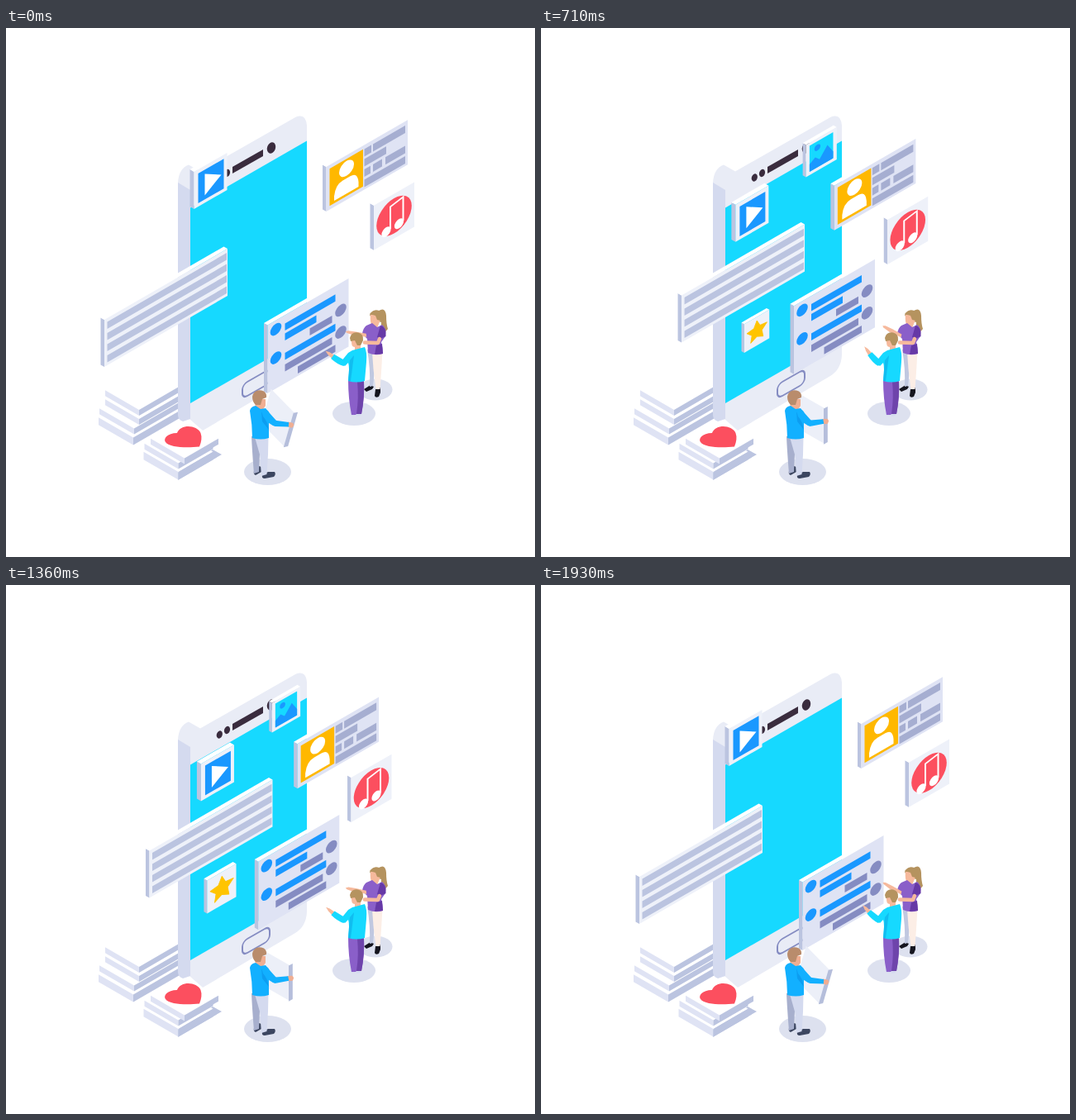
An HTML page for the animation above (2430 ms loop, 640 px wide and 640 px high).

```html
<!DOCTYPE html>
<html lang="en">
<head>
<meta charset="utf-8">
<title>Isometric phone</title>
<style>
html, body { margin: 0; width: 100%; height: 100%; overflow: hidden; background: #fff }
svg { display: block; width: 100vw; height: 100vh }
</style>
</head>
<body>
<svg viewBox="0 0 640 640">
  <g id="books"></g>
  <path fill="#fc4f5f" d="M234 506.500Q238 497 235.500 490C231 480 211 479 207 490C195 490 190 497 193 501C198 508 220 508 234 506.500Z"/>

  <g id="phone">
    <path fill="#e9ecf6" d="M208 187Q209 170 221 165.500L235 173.500L351 107.500Q363 103 364 118V396Q363 413 350 421L238 487L222 473Z"/>
    <path fill="#d4daef" d="M208 187L223 196V473L214 476Q208 474 208 468Z"/>
    <path fill="#16d9ff" d="M223 217.500L364 136.500V373L223 454Z"/>
    <g fill="#3a2c3e">
      <path d="M274 168L311 147V155L274 176Z"/>
      <ellipse cx="321" cy="145" rx="5" ry="6.800" transform="rotate(20 321 145)"/>
      <ellipse cx="258.300" cy="181" rx="3.400" ry="4.800" transform="rotate(20 258.300 181)"/>
      <ellipse cx="267.500" cy="175.500" rx="3.400" ry="4.800" transform="rotate(20 267.500 175.500)"/>
    </g>
    <rect width="33" height="17" rx="6" transform="matrix(1 -.577 0 1 286 431.500)" fill="none" stroke="#858cc2" stroke-width="2"/>
  </g>

  <g id="panels"></g>

  <g fill="#dde1ef">
    <ellipse cx="316.500" cy="537" rx="28.500" ry="16"/>
    <ellipse cx="421" cy="466.500" rx="26" ry="14.500"/>
    <ellipse cx="447" cy="437.500" rx="20.500" ry="13"/>
  </g>

  <g id="woman">
    <path fill="#15151f" d="M433 437L441 432L445 434L443 437L436 440ZM447 437L453 435V441L451 446Q447 448 446 445Z"/>
    <path fill="#c0c8e0" d="M437 389H448L446 414L444 433L440 434Q441 412 437 389Z"/>
    <path fill="#fceee6" d="M443 392L455.500 391L454 416L452.500 437H447.500Q444 414 443 392Z"/>
    <path fill="#b5935f" d="M440 347Q444 340 451 342Q459 337 460 348Q460 358 462 364L457 370Q453 364 454 356L443 353Z"/>
    <path fill="#f6b99c" d="M441 347L450 346L453 353L449 363L443 361Q440 355 441 347Z"/>
    <path fill="#b5935f" d="M440 346Q446 339 453 343L453 354L449 353L447 348Z"/>
    <path fill="#8a5fc9" d="M436 360L443 357L449 362L455 359Q461 363 459 373L454 380Q456 387 456 394Q447 397 438 393L437 376L431 370Q432 363 436 360Z"/>
    <path fill="#6639a6" d="M453 360Q460 361 459.500 373L453 376L449 374ZM448 384L455 382L456 394L446 395Z"/>
    <path fill="none" stroke="#f6b99c" stroke-width="4.500" stroke-linecap="round" stroke-linejoin="round" d="M452 376L450 381L434 380.500"/>
    <path id="wave" fill="#f6b99c" d="M436 374L421 370L413 366L411.500 364L415 363.500L424 366L436 370Z"/>
  </g>

  <g id="man">
    <path fill="#d4daef" d="M417 464H423V468Q420 470 417 468ZM424 464H429V469L424 470Z"/>
    <path fill="#8a5fc9" d="M414 426H433Q434 447 430 467H424L423 468H418Q414 448 414 426Z"/>
    <path fill="#6e44ab" d="M425 428H433Q434 447 430 467H424Q427 448 425 428Z"/>
    <path fill="#f6b99c" d="M418 376H429V390L422 391V386Q417 386 418 376Z"/>
    <path fill="#b5935f" d="M416 375Q418 367 426 368.500Q433 370 432 378L429 384L425 384L422 378L417 379Z"/>
    <path fill="#16d9ff" d="M419 390L434 386Q437 392 436 404L434 427Q424 430 414 427Q416 410 414 405L410 409L405 404L414 393Z"/>
    <path fill="#11bdf0" d="M416 402L421 396L417 427L414 427Z"/>
    <g id="point">
      <path fill="#f6b99c" d="M395 398L391 393L388.500 388L393 390L399 395Z"/>
      <path fill="#16d9ff" d="M394 398L398.500 393.500L410 402L411 407L408 409Q401 406 394 398Z"/>
    </g>
  </g>

  <g id="holder">
    <g id="board">
      <path fill="#eceff8" d="M308 440L343 460V503L308 483Z"/>
      <path fill="#b5bedb" d="M342 460.500L346.800 458V501L342 503.800Z"/>
    </g>
    <path fill="#3c4660" d="M300 536L306 530L309 531V537L302 541Q299 540 300 536ZM310 541L317 537L325 537Q327 540 324 543L313 545Q309 545 310 541Z"/>
    <path fill="#a7afcd" d="M297 494H309L307 515L306 537L300 539Q298 516 297 494Z"/>
    <path fill="#d4daef" d="M301 495H317.500L317 516L315.500 540L309 542L307 516Z"/>
    <path fill="#f0ae92" d="M301 449H314V457L310 463L302 462Z"/>
    <path fill="#b98c6c" d="M298 446Q300 437 309 438.500Q316 440 315 447L310 449L308 456L302 456Q298 452 298 446Z"/>
    <path fill="#12b0ff" d="M295 463Q296 458 302 457L308 461L314 460Q319 464 318 478V496Q308 499 298 496Q298 480 295 463Z"/>
    <path fill="#0d9df0" d="M309 464L316 478L318 486L310 476Z"/>
    <path fill="#12b0ff" d="M309 462Q315 459 319 466L327 475L326 482Q318 480 311 470Z"/>
    <g id="hold">
      <path fill="#f0ae92" d="M341 476L347 477Q350 480 346 483L341 482Z"/>
      <path fill="#12b0ff" d="M324 474.500L342 476.500V482L326 482Q321 480 324 474.500Z"/>
    </g>
  </g>
</svg>
<script>
const $ = id => document.getElementById(id);
const SLOPE = 0.577, LIGHT = '#eef1f9', PALE = '#dfe3f4', GREY = '#bbc4e0';
const BLUE = '#1a98ff', MAUVE = '#858cc2', CYAN = '#16d9ff';

const bar = (x, y, w, h, fill) => `<rect x="${x}" y="${y}" width="${w}" height="${h}" fill="${fill}"/>`;
const dot = (x, y, r, fill) => `<circle cx="${x}" cy="${y}" r="${r}" fill="${fill}"/>`;
const shape = (d, fill) => `<path d="${d}" fill="${fill}"/>`;

// Upright slab: content lives in flat coordinates and is skewed onto the face.
function slab(id, x, y, w, h, face, content, d = 4.5) {
  const e = -1.155 * d;
  $('panels').innerHTML += `<g id="${id}"><g transform="matrix(1 ${-SLOPE} 0 1 ${x} ${y})">` +
    shape(`M0 0L${-d} ${e}V${h + e}L0 ${h}Z`, GREY) +
    shape(`M0 0L${-d} ${e}H${w - d}L${w} 0Z`, '#fff') +
    bar(0, 0, w, h, face) + content + '</g></g>';
}

// Flat sheet on the floor, given by its front corner.
function sheet(x, y, left, right, h) {
  const ly = y - left * 0.58, ry = y - right * 0.58;
  $('books').innerHTML +=
    shape(`M${x} ${y}L${x - left} ${ly}L${x - left + right} ${ly + ry - y}L${x + right} ${ry}Z`, '#fff') +
    shape(`M${x} ${y}L${x - left} ${ly}v${h}L${x} ${y + h}Z`, PALE) +
    shape(`M${x} ${y}L${x + right} ${ry}v${h}L${x} ${y + h}Z`, GREY);
}

sheet(154, 495.5, 42, 60, 9);
sheet(155, 484.5, 42, 60, 7);
sheet(161, 473, 41, 52, 7);
sheet(161, 462, 41, 52, 7);
$('books').innerHTML += shape('M208 538L250 510L261 516L208 547Z', GREY);
sheet(208.5, 537, 42, 42, 9.5);
sheet(208.5, 526.5, 41, 42, 7);
sheet(216, 520.5, 41, 41, 7);

const star = Array.from({length: 10}, (_, k) => {
  const a = k * Math.PI / 5, r = k % 2 ? 8.5 : 17;
  return `${20.5 + r * Math.sin(a)} ${23 - r * Math.cos(a)}`;
}).join('L');

slab('photo', 318, 139, 43, 45, LIGHT,
  bar(5, 4, 33, 36.5, CYAN) + dot(16, 13, 4.2, BLUE) +
  shape('M5 30L13 25L19 31L30 17.500L38 31V40.500H5Z', BLUE));
slab('play', 227.5, 174, 40, 45, LIGHT,
  bar(5, 5, 31, 36, BLUE) + shape('M13 10L33 22.500L13 36Z', '#fff'), 5);
slab('star', 240.5, 356.5, 40.5, 46, LIGHT,
  `<path d="M${star}Z" fill="#ffc400" stroke="#ffc400" stroke-linejoin="round"/>`);
slab('text', 119, 353, 149, 57, LIGHT,
  [4.5, 18, 31.5, 45].map(y => bar(3.5, y, 144.5, 8.5, GREY)).join(''));
slab('chat', 316.5, 359.5, 98, 82.5, PALE,
  dot(10, 10.8, 6.8, BLUE) + dot(10, 45.3, 6.8, BLUE) +
  dot(88.5, 33, 6.8, MAUVE) + dot(88.5, 59.6, 6.8, MAUVE) +
  bar(21, 10, 61, 8.5, BLUE) + bar(21, 22, 38, 8.5, BLUE) + bar(51, 33.5, 27, 8.5, MAUVE) +
  bar(21, 45.5, 61, 8.5, BLUE) + bar(21, 59.5, 57, 8.5, MAUVE) + bar(36.5, 71, 45.5, 8.5, MAUVE));
slab('card', 387.5, 168, 98.5, 54, PALE,
  bar(4, 4.5, 40.5, 45, '#ffb800') + dot(24.5, 16, 9, '#fff') +
  shape('M9.500 46.500V41Q11 28 20 28H29Q38 28 39 41V46.500Z', '#fff') +
  [[46, 5, 8.5], [56.5, 5, 39], [46, 17, 26.5], [46, 29.5, 7.5], [56.5, 29.5, 11], [71.5, 29.5, 24], [46, 42, 49.5]]
    .map(([x, y, w]) => bar(x, y, w, 9, '#a6aed1')).join(''));
slab('music', 445, 214.8, 49, 54, LIGHT,
  dot(24.5, 26.6, 21.3, '#fc4f5f') + dot(15, 40.5, 5.6, '#fff') + dot(30.5, 39.5, 5.6, '#fff') +
  '<path d="M20 40V13L35.500 10V39" fill="none" stroke="#fff" stroke-width="2"/>');

// Linear interpolation through [step, value] pairs, held at both ends.
function key(i, ...pts) {
  if (i <= pts[0][0]) return pts[0][1];
  for (let k = 1; k < pts.length; k++) {
    const [a, u] = pts[k - 1], [b, v] = pts[k];
    if (i <= b) return u + (v - u) * (i - a) / (b - a);
  }
  return pts[pts.length - 1][1];
}

const put = (id, value) => $(id).setAttribute('transform', value);
const move = (id, p, x, y) => put(id, `translate(${p * x} ${p * y})`);
const grow = (id, s, x, y) => put(id, `translate(${x} ${y}) scale(${s}) translate(${-x} ${-y})`);
const turn = (id, a, x, y) => put(id, `rotate(${a} ${x} ${y})`);

const LOOP = 2430, STEP = LOOP / 34;

function draw(now) {
  const i = Math.floor(now % LOOP / STEP + 0.1);

  const p = key(i, [6, 0], [11.33, 1], [17.94, 1], [23.27, 0]);
  move('text', p, 68, -39.2);
  move('play', p, 10.5, 53);
  move('chat', p, -14, -31);
  move('card', p, -43.5, 30.3);
  move('music', p, -34.3, 22.8);

  const s = key(i, [6, 0], [12, 1], [16.6, 1], [22.4, 0]);
  grow('photo', Math.sin(s * Math.PI / 2), 337, 157);
  grow('star', key(i, [6, 0], [11.33, 1], [18.3, 1], [23.6, 0]), 262, 364);

  const tilt = key(i, [5, 1], [9.8, 0], [22, 0], [27, 1]);
  put('board', `translate(0 ${5 * tilt}) rotate(${16 * tilt} 344 481)`);
  turn('hold', 13 * tilt - 11, 325, 479);
  turn('wave', key(i, [5, -8], [6, -11], [8, 5], [10, 10], [16, 0], [21, -10], [27, 11]), 434, 372);
  turn('point', key(i, [5, -7], [6, -9], [8, 3], [10, 8], [16, 0], [21, -8], [27, 2]), 409, 406);

  requestAnimationFrame(draw);
}
draw(performance.now());
</script>
</body>
</html>
```
